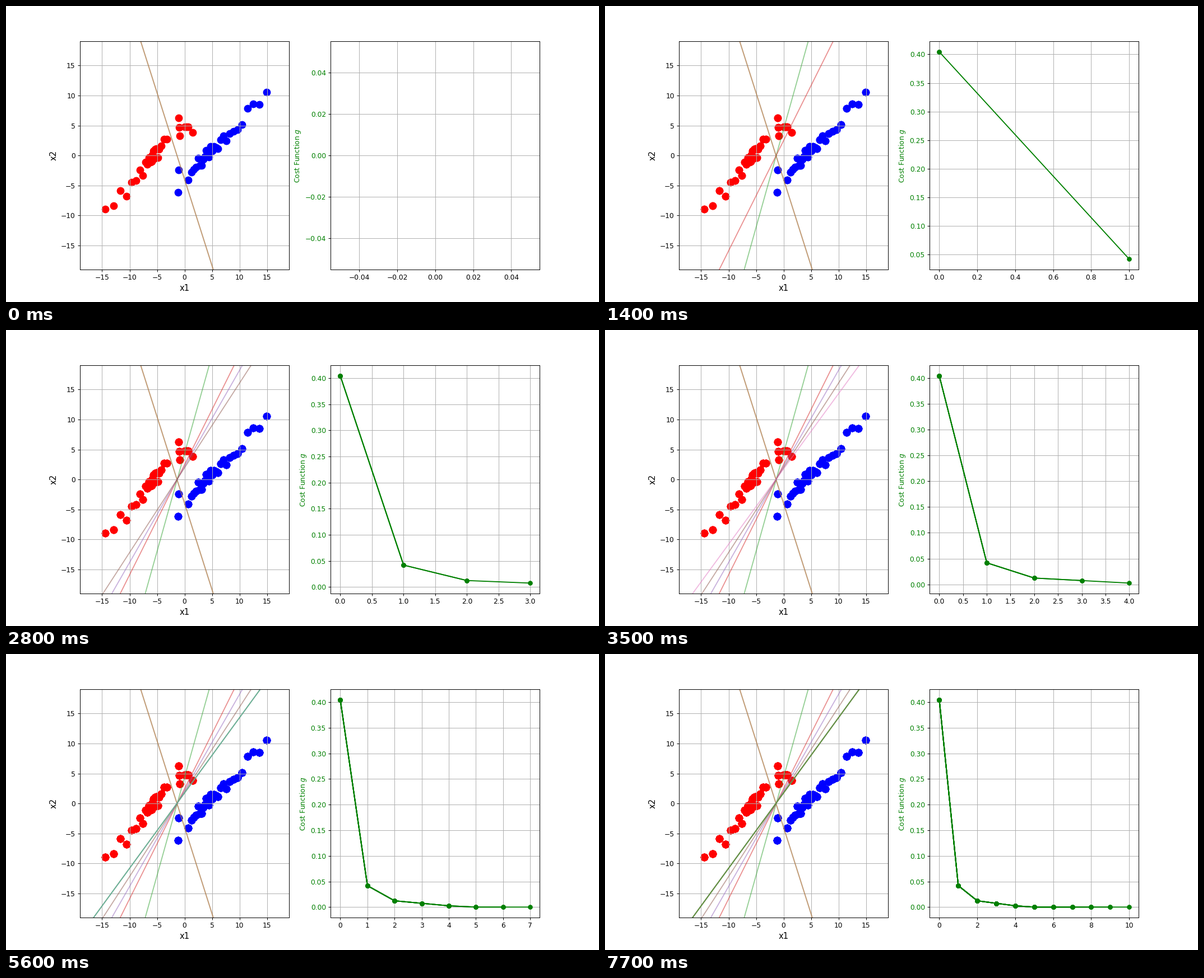
These frames come from a looping animation (1058x529 px, 8 s). A matplotlib script:

```python
import matplotlib.pyplot as plt
import numpy as np
from matplotlib.animation import FuncAnimation

WIDTH, HEIGHT = 1058, 529
DPI = WIDTH / 12
LIMIT = 19
TICK_MS, STEP_TICKS, LOOP_MS = 100, 7, 8000
FRAMES = LOOP_MS // TICK_MS
STEPS = (FRAMES - 1) // STEP_TICKS + 1

rng = np.random.default_rng(4)


def cloud(count, curve, slope, offset):
    """Points along a sloping band, dense in the middle, sparse at the ends."""
    x = np.polyval(curve, np.linspace(-1, 1, count))
    y = slope * x + offset + rng.uniform(-1.2, 1.2, count)
    return np.column_stack([x, y])


# the points next to the boundary steer the training, the clouds do not
RED_EDGE = [(-1.13, 6.31), (-0.98, 4.67), (0.04, 4.77), (0.38, 4.77),
            (0.65, 4.77), (1.47, 3.80), (-0.88, 3.27)]
BLUE_EDGE = [(-1.08, -2.40), (-1.23, -6.10)]
red = np.vstack([RED_EDGE, cloud(23, [3.2, -2.6, 2.4, -6.2], 1.1, 5.8)])
blue = np.vstack([BLUE_EDGE, cloud(28, [2.8, 2.6, 4.3, 5.2], 0.93, -3.9)])


def train(weights):
    """Perceptron by gradient descent; returns weights and cost per step."""
    points = np.vstack([red, blue])
    features = np.column_stack([np.ones(len(points)), points])
    labels = np.repeat([-1, 1], [len(red), len(blue)])
    path, costs = [], []
    for _ in range(STEPS):
        margin = labels * (features @ weights)
        path.append(weights)
        costs.append(np.maximum(0, -margin).mean())
        weights = weights + (labels * (margin < 0)) @ features / len(points)
    return path, costs


path, costs = train(np.array([1.46, 1.058, 0.367]))

fig, (data_ax, cost_ax) = plt.subplots(1, 2, figsize=(12, HEIGHT / DPI),
                                       dpi=DPI)
state = {"step": None}


def draw_data(step):
    data_ax.clear()
    y = np.array([-2 * LIMIT, 2 * LIMIT])
    # the start is plotted twice, and every pass adds to the earlier ones
    for bias, wx, wy in [path[0], *path[:step + 1]]:
        data_ax.scatter(*red.T, s=100, c="red")
        data_ax.scatter(*blue.T, s=100, c="blue")
        data_ax.plot(-(bias + wy * y) / wx, y, alpha=0.5)
    data_ax.set(xlim=(-LIMIT, LIMIT), ylim=(-LIMIT, LIMIT))
    data_ax.set_xlabel("x1", fontsize=12)
    data_ax.set_ylabel("x2", fontsize=12)
    data_ax.grid(True)


def draw_cost(step):
    cost_ax.clear()
    for count in range(step + 1):
        cost_ax.plot(range(count), costs[:count], "o-", color="green")
    cost_ax.set_ylabel("Cost Function $g$", color="green")
    cost_ax.tick_params(axis="y", labelcolor="green")
    cost_ax.grid(True)


def update(tick):
    step = tick // STEP_TICKS
    if step != state["step"]:
        state["step"] = step
        draw_data(step)
        draw_cost(step)
    return []


def reset():
    state["step"] = None
    return update(0)


anim = FuncAnimation(fig, update, frames=FRAMES, init_func=reset,
                     interval=TICK_MS, repeat=True, repeat_delay=0)
plt.show()
```
